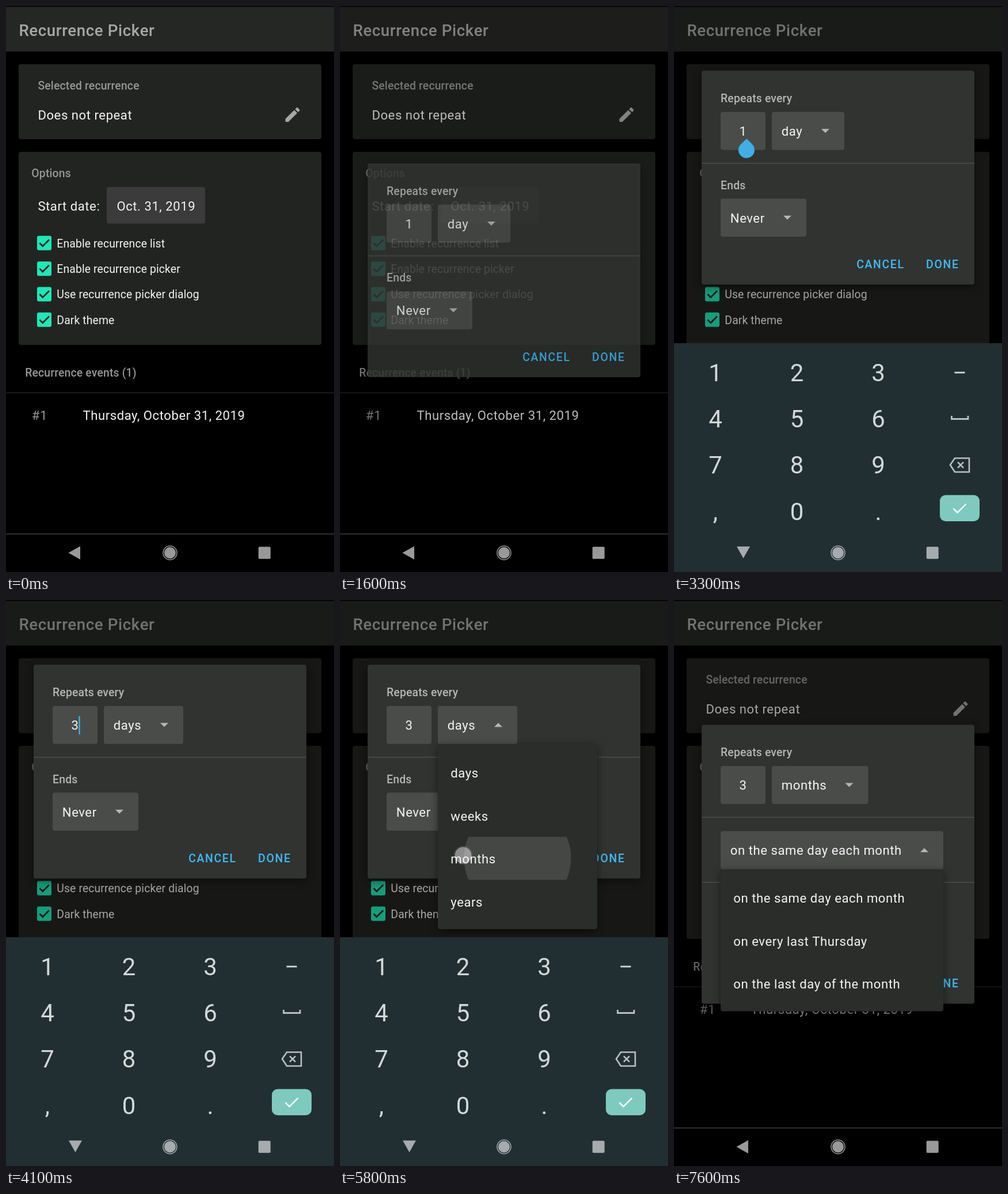
Write an HTML page with a canvas that moves like this. It is 570x982 px and loops after 8000 ms.

```html
<!DOCTYPE html>
<html lang="en">
<head>
<meta charset="utf-8">
<title>Recurrence Picker</title>
<style>
  html, body { margin: 0; width: 100%; height: 100%; overflow: hidden; background: #000; }
  canvas { display: block; }
</style>
</head>
<body>
<canvas id="stage" width="570" height="982"></canvas>
<script>
const stage = document.getElementById('stage').getContext('2d');
const layer = stage.canvas.cloneNode().getContext('2d');
let ctx = stage;

const LOOP = 8000, STEP = 100;
const WHITE = '#f4f4f4', GREY = '#a6a8a6', TEAL = '#1de9b6', BLUE = '#3dbcf5';
const CARD = '#222421', PANEL = '#313331', FIELD = '#4a4c4a', MENU = '#2b2d2b';
const NAV = 'rgba(255,255,255,.6)', KEY = '#d3d8d8';
const PENCIL = new Path2D('M3 17.25V21h3.75L17.81 9.94l-3.75-3.75L3 17.25zM20.71 7.04c.39-.39.39-1.02 0-1.41l-2.34-2.34c-.39-.39-1.02-.39-1.41 0l-1.83 1.83 3.75 3.75 1.83-1.83z');

// [size, letter spacing, weight]
const TITLE = [27.7, 0.6, 500], BODY = [22.17, 0.52, 400], LABEL = [19.4, 0.15, 500],
      SMALL = [19.4, 0.11, 400], BUTTON = [19.4, 1.65, 500], DIGIT = [42, 0, 400];

const RECURRENCES = ['Does not repeat', 'Every day', 'Every week', 'Every month', 'Every year', 'Custom…'];
const OPTIONS = ['Enable recurrence list', 'Enable recurrence picker', 'Use recurrence picker dialog', 'Dark theme'];
const UNITS = ['days', 'weeks', 'months', 'years'];
const MONTH_MODES = ['on the same day each month', 'on every last Thursday', 'on the last day of the month'];
const UNIT_WIDTH = { day: 126, days: 138, months: 167.5 };

// [start, hold, x, y]
const TOUCHES = [
  [300, 200, 498, 190], [1300, 100, 190, 618], [2700, 100, 134, 377], [3500, 100, 500, 798],
  [3900, 100, 350, 638], [5000, 100, 240, 220], [5700, 200, 214, 443], [6800, 100, 280, 436]
];

const ramp = (t, a, b) => Math.min(1, Math.max(0, (t - a) / (b - a)));
const during = (t, a, b) => t >= a && t < b;

function text(str, x, middle, [size, spacing, weight], color = WHITE, align = 'left') {
  ctx.font = `${weight} ${size}px Roboto, sans-serif`;
  ctx.letterSpacing = spacing + 'px';
  ctx.textAlign = align;
  ctx.fillStyle = color;
  ctx.fillText(str, x, middle + size * 0.356);
}

function box(x, y, w, h, color, radius = 4) {
  ctx.fillStyle = color;
  ctx.beginPath();
  ctx.roundRect(x, y, w, h, radius);
  ctx.fill();
}

function raised(...args) {
  ctx.save();
  ctx.shadowColor = 'rgba(0,0,0,.5)';
  ctx.shadowBlur = 14;
  ctx.shadowOffsetY = 4;
  box(...args);
  ctx.restore();
}

function disc(x, y, r, color) {
  ctx.fillStyle = color;
  ctx.beginPath();
  ctx.arc(x, y, r, 0, 7);
  ctx.fill();
}

function ring(x, y, r, width, color) {
  ctx.strokeStyle = color;
  ctx.lineWidth = width;
  ctx.beginPath();
  ctx.arc(x, y, r, 0, 2 * Math.PI);
  ctx.stroke();
}

function line(points, width, color, close) {
  ctx.strokeStyle = color;
  ctx.lineWidth = width;
  ctx.beginPath();
  points.forEach(p => ctx.lineTo(...p));
  if (close) ctx.closePath();
  ctx.stroke();
}

function triangle(points, color) {
  ctx.fillStyle = color;
  ctx.beginPath();
  points.forEach(p => ctx.lineTo(...p));
  ctx.fill();
}

// Draws a group on its own layer, so that it fades as one piece.
function withAlpha(alpha, drawGroup) {
  if (alpha <= 0) return;
  ctx = layer;
  ctx.clearRect(0, 0, 570, 982);
  ctx.save();
  drawGroup();
  ctx.restore();
  ctx = stage;
  ctx.globalAlpha = alpha;
  ctx.drawImage(layer.canvas, 0, 0);
  ctx.globalAlpha = 1;
}

function drawApp(resized) {
  ctx.save();
  if (resized) {
    ctx.beginPath();
    ctx.rect(0, 0, 570, 585);
    ctx.clip();
  }
  box(0, 1.5, 570, 77.5, '#252724', 0);
  text('Recurrence Picker', 22.4, 42, TITLE, GREY);

  box(22, 101, 526, 130, CARD);
  text('Selected recurrence', 55.4, 138.5, LABEL, '#959795');
  text('Does not repeat', 55.4, 189.5, BODY);
  ctx.save();
  ctx.translate(481.4, 171.9);
  ctx.scale(1.386, 1.386);
  ctx.fillStyle = GREY;
  ctx.fill(PENCIL);
  ctx.restore();

  box(22, 253, 526, 335, CARD);
  text('Options', 44.3, 290, LABEL, '#959795');
  text('Start date:', 55.4, 347, BODY);
  box(175, 314, 171, 63.5, '#3c3b3b');
  text('Oct. 31, 2019', 192.4, 347, BODY);
  OPTIONS.forEach((label, i) => {
    const y = 411.3 + i * 44.35;
    box(54, y - 12.5, 25, 25, TEAL, 3);
    line([[58.5, y], [63.7, y + 5.4], [75, y - 5.8]], 2.8, CARD);
    text(label, 88.3, y + 0.4, SMALL);
  });

  text('Recurrence events (1)', 33.2, 636, LABEL, '#959795');
  box(0, 670.3, 570, 1.4, '#222322', 0);
  text('#1', 44.8, 710.5, BODY, '#949694');
  text('Thursday, October 31, 2019', 133.5, 710.5, BODY);
  ctx.restore();
}

function drawList() {
  raised(48, 255, 474, 406, PANEL);
  RECURRENCES.forEach((label, i) => {
    const y = 298.5 + i * 63.9;
    ring(92, y, 12.6, 2.7, i ? '#8f918f' : TEAL);
    if (!i) disc(92, y, 7, TEAL);
    text(label, 136.2, y + 1, BODY);
  });
}

function spinner(label, x, y, w, open) {
  box(x, y, w, 66, FIELD);
  text(label, x + 16.8, y + 33.5, BODY);
  const ax = x + w - 33, dir = open ? -3.5 : 3.5, ay = y + 33;
  triangle([[ax - 7, ay - dir], [ax + 7, ay - dir], [ax, ay + dir]], '#b5b7b5');
}

function drawPicker(t, top) {
  const count = t < 3600 ? '1' : t < 4000 ? '' : '3';
  const unit = t < 4000 ? 'day' : t < 5900 ? 'days' : 'months';
  const extra = t >= 6000 ? 113 : 0;
  const divider = y => box(48, y - 0.8, 474, 1.6, '#4c4e4c', 0);

  raised(48, top, 474, 371 + extra, PANEL);
  text('Repeats every', 81.1, top + 48, LABEL, '#b4b6b4');
  box(81, top + 71.5, 78, 66, FIELD);
  text(count, 120, top + 105, BODY, WHITE, 'center');
  spinner(unit, 170, top + 71.5, UNIT_WIDTH[unit], during(t, 5200, 5900));
  divider(top + 160.5);
  if (extra) {
    spinner(MONTH_MODES[0], 81, top + 184.5, 387, t >= 7000);
    divider(top + 273.3);
  }
  const low = top + extra;
  text('Ends', 81.1, low + 198.3, LABEL, '#b4b6b4');
  spinner('Never', 81, low + 222, 149);
  text('CANCEL', 317.2, low + 335.8, BUTTON, BLUE);
  text('DONE', 438.1, low + 335.8, BUTTON, BLUE);

  const blinkStart = t < 3600 ? 2800 : 4000;
  const typing = during(t, 3600, 4000);
  if (during(t, 2800, 5000) && (typing || (t - blinkStart) % 1000 < 500))
    box(count ? 126.3 : 119, top + 89, 2.4, 32, '#45abe0', 0);
  if (during(t, 2800, 3600)) {
    const y = top + 121;
    ctx.fillStyle = '#41aee4';
    ctx.beginPath();
    ctx.moveTo(126, y - 3);
    ctx.lineTo(136, y + 6.5);
    ctx.arc(126, y + 16.5, 14, -0.78, Math.PI + 0.78);
    ctx.fill();
  }
}

function drawMenu(x, y, w, items, pressed = -1, rippleRadius = 0) {
  const h = items.length * 74.5 + 23;
  raised(x, y, w, h, MENU);
  if (pressed >= 0) {
    const rowY = y + 12 + pressed * 74.5;
    ctx.save();
    ctx.beginPath();
    ctx.rect(x, rowY, w, 74.5);
    ctx.clip();
    disc(x + w / 2, rowY + 37, rippleRadius, '#454745');
    ctx.restore();
  }
  items.forEach((label, i) => text(label, x + 22.3, y + 50.6 + i * 74.5, BODY));
}

function drawKeyboard(t) {
  const cols = [72, 213.5, 355, 496.5], rows = [636, 716.3, 796.5, 877];
  box(0, 585, 570, 500, '#222f32', 0);
  if (during(t, 3500, 3800)) disc(cols[3], rows[2], 40, 'rgba(255,255,255,.09)');
  if (during(t, 3900, 4100)) disc(cols[2], rows[0], 40, 'rgba(255,255,255,.09)');
  ['123', '456', '789', ',0.'].forEach((keys, r) =>
    [...keys].forEach((key, c) => text(key, cols[c], rows[r], DIGIT, KEY, 'center')));

  const icon = '#bac0c0';
  line([[487.5, 636], [505.5, 636]], 2.8, KEY);
  line([[482.5, 711], [482.5, 716.5], [511, 716.5], [511, 711]], 2.8, icon);
  line([[480, 796.3], [488, 784.5], [513, 784.5], [513, 808.5], [488, 808.5]], 2.6, icon, true);
  line([[493, 791.3], [503, 801.3]], 2.6, icon);
  line([[503, 791.3], [493, 801.3]], 2.6, icon);
  box(462, 848.5, 69, 45.5, '#7ecabe', 10);
  line([[485.5, 872], [492.5, 879], [507.5, 864]], 2.5, '#f2f8f7');
}

function drawNav(turn) {
  ctx.save();
  ctx.translate(120.5, 948.7 - 2.5 * turn);
  ctx.rotate(-turn * Math.PI / 2);
  triangle([[-12, 0], [8.5, -11.5], [8.5, 11.5]], NAV);
  ctx.restore();
  disc(285, 948.7, 10, NAV);
  ring(285, 948.7, 12, 1.5, NAV);
  box(438.7, 938.3, 21, 21, NAV, 2);
}

function drawTouches(t) {
  for (const [start, hold, x, y] of TOUCHES) {
    const age = t - start;
    if (!during(age, 0, hold + 100)) continue;
    const strength = age < hold ? 0.42 : 0.22;
    disc(x, y, 17, `rgba(255,255,255,${strength * 0.15})`);
    disc(x, y, 14.5, `rgba(255,255,255,${strength})`);
  }
}

function draw(t) {
  const listAlpha = ramp(t, 400, 700) * (1 - ramp(t, 1300, 1500));
  const pickerAlpha = ramp(t, 1400, 1640);
  const dim = 0.32 * Math.max(listAlpha ** 2, pickerAlpha ** 2);
  const keyboard = t < 5900 ? 1 - (1 - ramp(t, 2700, 3000)) ** 1.63 : 1 - ramp(t, 5900, 6200);
  const dialogTop = t < 5900 ? 273 - 160.7 * keyboard : 216.5 - 104.2 * keyboard;

  ctx.fillStyle = '#000';
  ctx.fillRect(0, 0, 570, 982);
  drawApp(during(t, 2800, 6000));
  if (during(t, 400, 600)) disc(498, 188.5, 32, 'rgba(255,255,255,.1)');
  box(0, 0, 570, 915, `rgba(0,0,0,${dim})`, 0);

  withAlpha(listAlpha, () => {
    drawList();
    if (t >= 1300) box(48, 586, 474, 64, 'rgba(255,255,255,.08)', 0);
  });
  withAlpha(pickerAlpha, () => drawPicker(t, dialogTop));

  box(0, 915.3, 570, 1.5, '#3e3f3e', 0);
  withAlpha(keyboard && 0.46 + 0.54 * keyboard, () => {
    ctx.translate(0, 77 * (1 - keyboard));
    drawKeyboard(t);
  });
  drawNav(keyboard ** 1.7);

  withAlpha(ramp(t, 5100, 5400) * (1 - ramp(t, 5800, 6000)), () =>
    drawMenu(170, 250, 277, UNITS, t >= 5700 ? 2 : -1, 20 + 0.73 * (t - 5700)));
  withAlpha(ramp(t, 6900, 7200), () => drawMenu(81, 467, 387, MONTH_MODES));
  drawTouches(t);
}

function tick() {
  const t = performance.now() % LOOP;
  draw(Math.floor(t / STEP) * STEP);
  requestAnimationFrame(tick);
}
tick();
</script>
</body>
</html>
```
